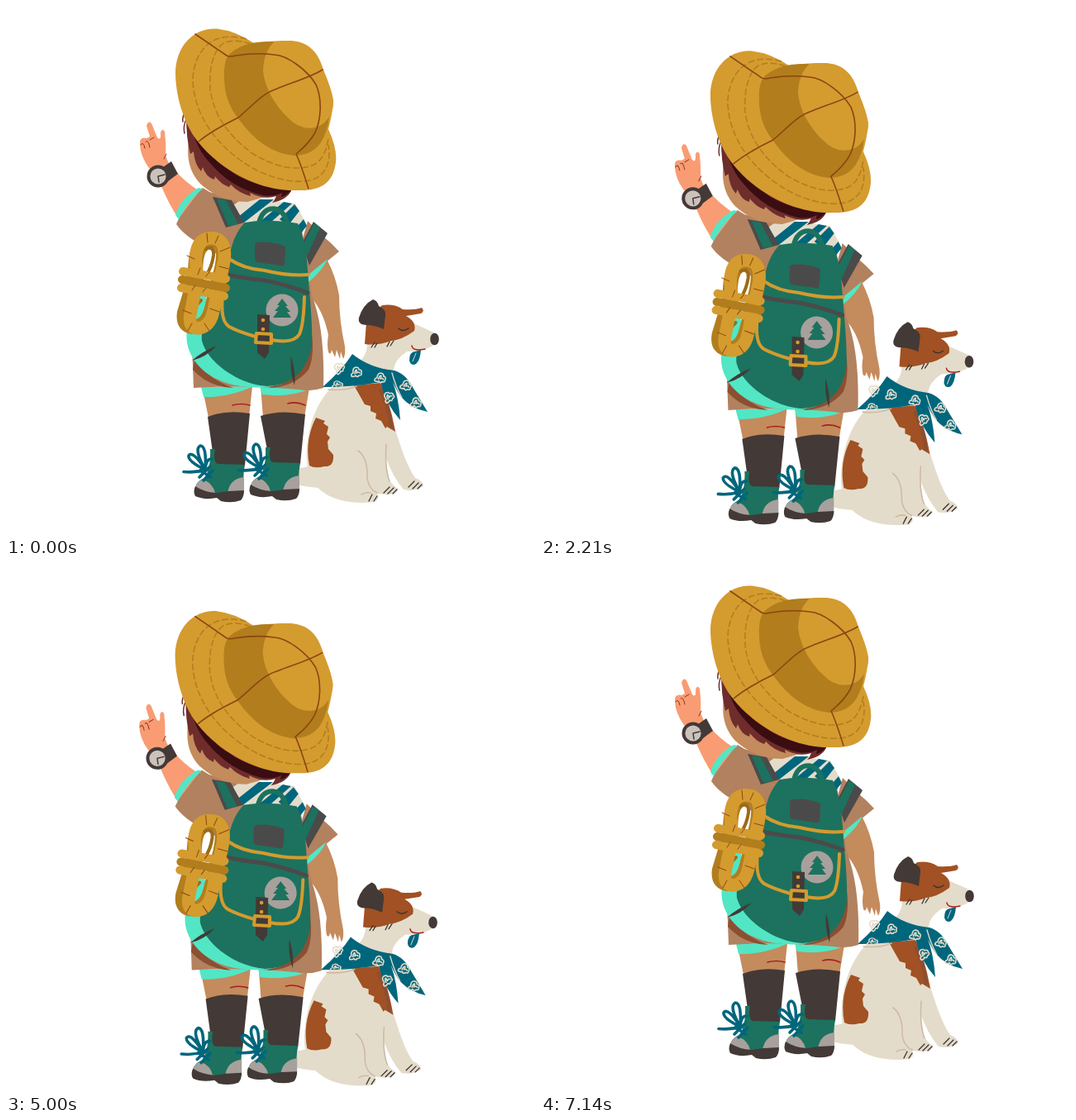
An HTML page for the animation above (7210 ms loop, 640 px wide and 640 px high).

```html
<!DOCTYPE html>
<html lang="en">
<head>
<meta charset="utf-8">
<title>Young explorer</title>
<style>
  html, body { margin: 0; width: 100%; height: 100%; overflow: hidden; background: #fff; }
  svg { display: block; width: 100%; height: 100%; }
  .gold { fill: #d49b2f; }
  .ochre { fill: #b27d1c; }
  .green { fill: #1c725e; }
  .mint { fill: #52e6c5; }
  .dark { fill: #433936; }
  .slate { fill: #4b4a4a; }
  .cream { fill: #e4dcca; }
  .rust { fill: #a15123; }
  .teal { fill: #00667c; }
  .skin { fill: #c48b5d; }
  .peach { fill: #f99c73; }
  .shirt { fill: #b2815f; }
  .grey { fill: #a8a09c; }
  .trim { fill: #8b4f32; }
  .line { fill: none; stroke-linecap: round; stroke-linejoin: round; }
  .seam { stroke: #8b4513; stroke-width: 1.6; }
  .stitch { stroke: #b27d1c; stroke-width: 1.5; stroke-dasharray: 8 3; stroke-linecap: butt; }
  .piping { stroke: #d49b2f; stroke-width: 4; }
  .fine { stroke: #3b3230; stroke-width: 1.3; }
  .fold { stroke: #cdbba6; stroke-width: 1.6; }
  .scar { stroke: #a8201f; stroke-width: 1.6; }
  .lace { stroke: #00667c; stroke-width: 3.6; }
</style>
</head>
<body>
<svg viewBox="0 0 640 640">
  <defs>
    <path id="print" class="line" stroke="#e4dcca" stroke-width="1.6"
      d="M-6 5Q-7 2-4 1Q-5-5-1-6Q3-6 3-3Q7-3 6 1Q7 4 3 4Q1 7-1 4Q-3 6-6 5ZM-2 2Q-2-2 0-3Q1-1 0 1Q3-1 4 1"/>
    <g id="boot">
      <path class="green" d="M247 536L253 536Q250 552 256 554L289 555Q286 570 288 588Q258 594 229 583Q230 575 240 571Q248 560 247 536Z"/>
      <path class="grey" d="M229 584Q230 575 238 573Q250 577 253 589Q240 589 229 584ZM268 590Q270 572 288 570L288 589Z"/>
      <path class="dark" d="M229 581Q239 588 255 589L269 587L288 586Q288 594 284 598Q273 602 260 599L255 595Q240 598 229 593Q226 588 229 581Z"/>
      <path class="line lace" d="M215 563.500Q229 565 241 561Q220 551 221 544Q226 537 241 561Q227 536 235 532Q243 532 241 561Q242 547 249 548M234 570L247 557M235 562L248 570M239 574L250 562"/>
    </g>
  </defs>

  <g id="scene">
    <g id="dog">
      <path class="cream" d="M340 560Q362 561 376 552L384 583Q360 583 340 575Z"/>
      <path class="cream" d="M398 458C378 474 366 505 364 535C362 560 368 576 382 587C397 599 422 603 446 600Q453 596 449 590L459 591Q474 591 474 584Q466 579 463 571L459 545Q468 570 481 585Q494 588 505 581Q504 574 495 571C483 553 478 533 470 510L449 455Z"/>
      <path class="rust" d="M375 498L386 502L384 505L390 509L388 518L392 522L389 527L390 536L396 543Q397 558 385 557Q374 560 367 556Q361 525 375 498Z"/>
      <path class="rust" d="M421 459L453 456Q465 480 471 515L461 509L459 511L454 502L447 499L448 493L441 490L441 484L434 482Z"/>
      <path class="line" stroke="#8b4f32" stroke-width="4" d="M453 465Q464 486 466 509"/>
      <path class="line fold" d="M426 538Q438 547 437 571Q439 585 449 589M430 591Q435 588 441 589M460 530Q458 560 464 575M390 464Q410 466 424 460"/>
      <path class="line fine" d="M439 599L443 591M445 599L449 593M457 589L464 582M462 590L469 583M468 590L473 585M487 582L494 575M492 584L499 577M498 584L503 579"/>
      <path class="cream" d="M437 405Q438 424 424 433L423 440Q447 454 469 440Q470 428 485 418Q506 418 518 410L520 396L493 384Z"/>
      <path class="rust" d="M434 409L436 382L455 362Q470 360 480 367Q494 368 503 365Q507 369 502 372L484 375Q497 382 494 393Q479 404 466 405Q450 411 434 409Z"/>
      <path class="dark" d="M427 377Q432 361 444 355Q449 356 451 363Q460 367 459 374L457 391Q445 386 437 386Q425 386 427 377Z"/>
      <ellipse class="dark" cx="518.500" cy="403" rx="5.300" ry="7.300"/>
      <path class="teal" d="M488 429Q488 418 495 418L502 416Q501 429 496 433Q490 436 488 429Z"/>
      <path class="line" stroke="#d4d9d5" stroke-width="1" d="M496 420L492 430"/>
      <path class="line" stroke="#a8201f" stroke-width="1.500" d="M491 411Q492 418 507 415"/>
      <path class="line fine" d="M475 390Q480 395 487 390M442 413L446 407M446 413L449 408M461 412L464 406M465 411L469 405"/>
      <path class="teal" d="M383 461Q407 440 419 421Q440 438 470 441Q484 445 493 463L510 491Q490 487 478 473Q473 466 468 455Q475 474 477 501Q459 481 453 455Q420 461 383 461Z"/>
      <path class="line" stroke="#e4dcca" stroke-width="1.300" d="M467 444Q472 462 479 474"/>
      <use href="#print" transform="translate(403 438) rotate(-40)"/>
      <use href="#print" transform="translate(424 443)"/>
      <use href="#print" transform="translate(401 458) scale(1 .7)"/>
      <use href="#print" transform="translate(453 450) rotate(15)"/>
      <use href="#print" transform="translate(463 473) rotate(-30)"/>
      <use href="#print" transform="translate(484 459) rotate(20)"/>
      <use href="#print" transform="translate(496 480) rotate(10)"/>
    </g>

    <g id="legs">
      <path class="skin" d="M238 464L298 460L294 498L245 498ZM308 460L367 462L361 498L311 498Z"/>
      <path class="dark" d="M244 497Q266 488 295 493L289 556Q268 558 252 554ZM308 496Q332 488 362 494L356 554Q335 555 319 552Z"/>
      <path class="mint" d="M236 461L299 460Q270 474 239 473ZM307 460L368 461L366 464Q341 474 310 470Z"/>
      <path class="line scar" d="M274 483Q285 480 295 483M341 481Q351 478 362 483"/>
      <use href="#boot"/>
      <use href="#boot" x="67" y="-2"/>
    </g>

    <g id="body">
      <path class="skin" d="M365 328L388 306Q399 327 403 350Q403 380 410 412Q411 422 408 427L405 418L404 427L400 416L398 425L394 416Q393 423 390 419Q388 409 390 398Q383 365 366 350Z"/>
      <path class="shirt" d="M245 225L355 250L370 350Q386 390 384 462Q369 467 354 464Q290 458 227 462L225 410L265 340Z"/>
      <path class="shirt" d="M238 220L264 236L275 305Q258 305 243 292Q217 280 206 264Q218 235 238 220Z"/>
      <path class="shirt" d="M365 260L383 278Q394 287 403 297L365 328L358 285Z"/>
      <path class="mint" d="M366 325L389 306Q383 320 366 334Z"/>
      <path class="peach" d="M187 216Q199 244 209 257L234 224Q214 211 204 198Z"/>
      <path class="mint" d="M205 253Q211 232 233 220L238 221Q219 237 209 258Z"/>
      <path class="peach" d="M173 196Q162 181 162 166Q162 158 170 160L174 158L170 145Q172 138 176 142L183 159Q188 164 187 153Q189 147 192 152Q194 170 193 181Q197 191 200 197L188 207Z"/>
      <path class="line" stroke="#8a3524" stroke-width="1" d="M163 168Q166 163 168 172M169 164Q172 161 174 171M174 162L179 159M191 185L194 179"/>
      <path class="dark" d="M190 195L200 188L208 203L196 212Z"/>
      <circle class="dark" cx="184" cy="206" r="13.500"/>
      <circle cx="184" cy="206" r="9.600" fill="#cbc2bb"/>
      <path class="line" stroke="#433936" stroke-width="1.500" d="M192 204L184 206L185 213"/>
      <path class="cream" d="M275 241L289 231L350 239L364 265L350 281L291 265Z"/>
      <path class="teal" d="M281 255L307 234L324 234L288 262ZM306 262L336 237L346 239L320 262ZM331 258L349 240L355 248L341 266ZM345 275L360 258L364 266L352 281Z"/>
    </g>

    <g id="head">
      <path class="skin" d="M224 148C217 176 219 198 235 215Q259 237 292 237L330 226Z"/>
      <path fill="#6e2d2c" d="M218 132Q218 160 223 179L227 176Q228 191 236 200L238 195Q242 207 252 210L253 206Q260 216 270 219L272 216Q281 226 296 230L295 226Q313 235 327 230Q325 235 322 238Q342 234 346 221L240 135Z"/>
      <path fill="#3a0d11" d="M222 140Q241 178 278 204Q305 220 346 222Q339 230 333 231L334 226Q324 231 311 229Q272 220 247 190Q230 173 222 140Z"/>
      <path class="line" stroke="#6e2d2c" stroke-width="1.500" d="M217 128Q213 134 214 140M218 137Q214 146 216 154M221 144Q219 157 222 166"/>
      <path class="gold" d="M255 27.500Q278 30 300 45Q319 42 342 42C370 43 379 62 384 78Q394 101 396 116Q395 130 390 149Q401 173 399 189C396 214 381 224 353 223C312 225 262 202 232 164C214 141 205 107 205 80C206 48 227 26 255 27.500Z"/>
      <path class="ochre" d="M324 43Q290 42 273 56Q263 63 264 86Q264 115 281 136Q310 177 348 181Q370 181 381 165Q389 152 391 134Z"/>
      <path class="gold" d="M325 43Q312 54 311 78C313 100 327 122 341 135Q354 149 370 147.500C386 147 397 130 396 114C394 101 388 88 384 77C376 50 361 41 337 42Z"/>
      <path class="line stitch" d="M291 40Q272 35 258 39C235 46 226 70 226 91C228 127 247 157 275 180C304 204 338 214 361 212C386 210 394 190 390 168M296 46Q277 39 263 45C248 56 246 82 247 100C251 135 273 160 299 179C326 195 350 200 370 193Q386 187 390 160"/>
      <path class="line seam" d="M229 34L267 60Q270 62 278 60Q302 56 325 59C341 60 365 78 375 95C383 113 381 138 374 153Q367 166 351 179Q357 192 366 221M233 164Q250 150 281 135C297 122 309 106 328 100C344 93 367 87 383 77"/>
    </g>

    <g id="backpack">
      <path class="trim" d="M228 428Q240 446 265 458L275 462Q245 461 226 440ZM368 385Q375 420 366 440Q349 461 318 462L345 448Z"/>
      <path class="mint" d="M239 340Q215 378 219 407C223 432 247 455 284 460Q312 464 334 457L260 420Z"/>
      <path class="slate" d="M250 231L273 235L288 262L266 268Z"/>
      <path class="green" d="M255 233L266 235L281 264L269 266Z"/>
      <path class="slate" d="M372 261L389 275L367 314L358 287Z"/>
      <path class="green" d="M373 263L380 268L364 303L360 288Z"/>
      <path class="line" stroke="#1c725e" stroke-width="6" stroke-linecap="butt" d="M306 264C309 238 340 238 341 270"/>
      <path class="green" d="M289 262Q315 257 353 263Q362 282 364 308L367 345Q371 387 370 410C365 440 347 459 316 460C282 458 244 432 237 405C235 390 244 370 260 345L270 306Q274 277 289 262Z"/>
      <path class="dark" d="M225 429Q237 418 255 411Q242 425 225 429ZM345 424Q351 445 349 459Q343 440 345 424Z"/>
      <path class="slate" d="M304 286Q320 284 336 290Q339 291 338 296L337 312Q336 315 332 314L304 310Q301 309 301 305L301 290Q301 287 304 286Z"/>
      <path class="line" stroke="#4b4a4a" stroke-width="5" stroke-linecap="butt" d="M268 325Q286 329 313 332Q342 338 365 347"/>
      <path class="line piping" d="M270 306Q287 318 313 320Q342 327 366 325M262 352Q259 381 270 388Q281 394 302 400M321 404Q348 409 355 397Q360 386 361 352"/>
      <circle class="grey" cx="334" cy="368" r="19.500"/>
      <path class="green" d="M334 354L341 363L338 363L344 370L340 370L345 377L323 377L329 369L325 369L331 362L328 362Z"/>
      <path class="dark" d="M304 373L319 374L318 419L313 427L304 419Z"/>
      <path class="line piping" d="M303 396L321 397L321 408L302 407Z"/>
      <circle class="gold" cx="311" cy="380" r="2.300"/>
      <circle class="gold" cx="311" cy="391" r="2.300"/>
    </g>

    <g id="rope">
      <path class="line" stroke="#b27d1c" stroke-width="18" d="M248 284C265 280 265 298 261 318L250 362Q245 386 230 388Q213 389 216 371L229 328C229 310 229 286 248 284Z"/>
      <path class="line" stroke="#9a6b17" stroke-width="4" d="M242 294Q252 289 251 302Q249 316 242 326M236 356Q227 364 226 377"/>
      <path class="line" stroke="#d49b2f" stroke-width="15.500" d="M244 281C262 279 266 291 264 307L251 369Q247 388 233 390Q220 390 223 373L232 328C228 310 227 285 244 281Z"/>
      <path class="line" stroke="#d49b2f" stroke-width="10" d="M214 321L266 330M212 341L264 351"/>
      <path class="line" stroke="#b27d1c" stroke-width="10" d="M213 331L266 341"/>
      <path class="line" stroke="#8b4513" stroke-width="1" d="M243 275L244 286M257 278L253 287M219 302L228 306M259 297L271 292M258 315L269 318M235 317L232 325M242 327L246 322M225 344L229 338M238 346L242 341M214 368L224 372M247 366L258 370M225 384L220 393M240 384L246 393"/>
    </g>
  </g>
</svg>
<script>
  const FRAMES = 101, LOOP = 7210, SWAYS = 3, MAX_TILT = 2, TILT_PEAK = 0.41;
  // [frame, vertical offset]
  const bob = [[0, 0], [11, 23.6], [20, 38], [31, 27], [44, 15], [52, 10],
    [56, 10.8], [66, 23], [70, 31], [78, 39], [82, 36.9], [88, 22], [100, 0]];
  const scene = document.getElementById('scene');

  const slope = (a, b) => (b[1] - a[1]) / (b[0] - a[0]);

  // Tangent that goes flat at the turning points.
  function tangent(i) {
    if (i === 0 || i === bob.length - 1) return 0;
    const before = slope(bob[i - 1], bob[i]), after = slope(bob[i], bob[i + 1]);
    return before * after <= 0 ? 0 : 2 * before * after / (before + after);
  }

  function lift(frame) {
    const i = Math.min(bob.length - 2, bob.findLastIndex(key => key[0] <= frame));
    const [x0, y0] = bob[i], [x1, y1] = bob[i + 1];
    const span = x1 - x0, u = (frame - x0) / span, v = 1 - u;
    return y0 * v * v * (1 + 2 * u) + y1 * u * u * (3 - 2 * u)
      + span * u * v * (tangent(i) * v - tangent(i + 1) * u);
  }

  function tilt(frame) {
    const phase = frame * SWAYS / (FRAMES - 1) % 1;
    const u = phase < TILT_PEAK ? phase / TILT_PEAK : (1 - phase) / (1 - TILT_PEAK);
    return MAX_TILT * (1 - Math.cos(Math.PI * u)) / 2;
  }

  function draw() {
    // Frame delays are rounded to 10 ms, so a step may fall slightly early.
    const frame = Math.floor(performance.now() % LOOP / LOOP * FRAMES + 0.1) % FRAMES;
    scene.setAttribute('transform',
      `translate(0 ${lift(frame).toFixed(2)}) rotate(${tilt(frame).toFixed(3)} 320 0)`);
    requestAnimationFrame(draw);
  }
  draw();
</script>
</body>
</html>
```
